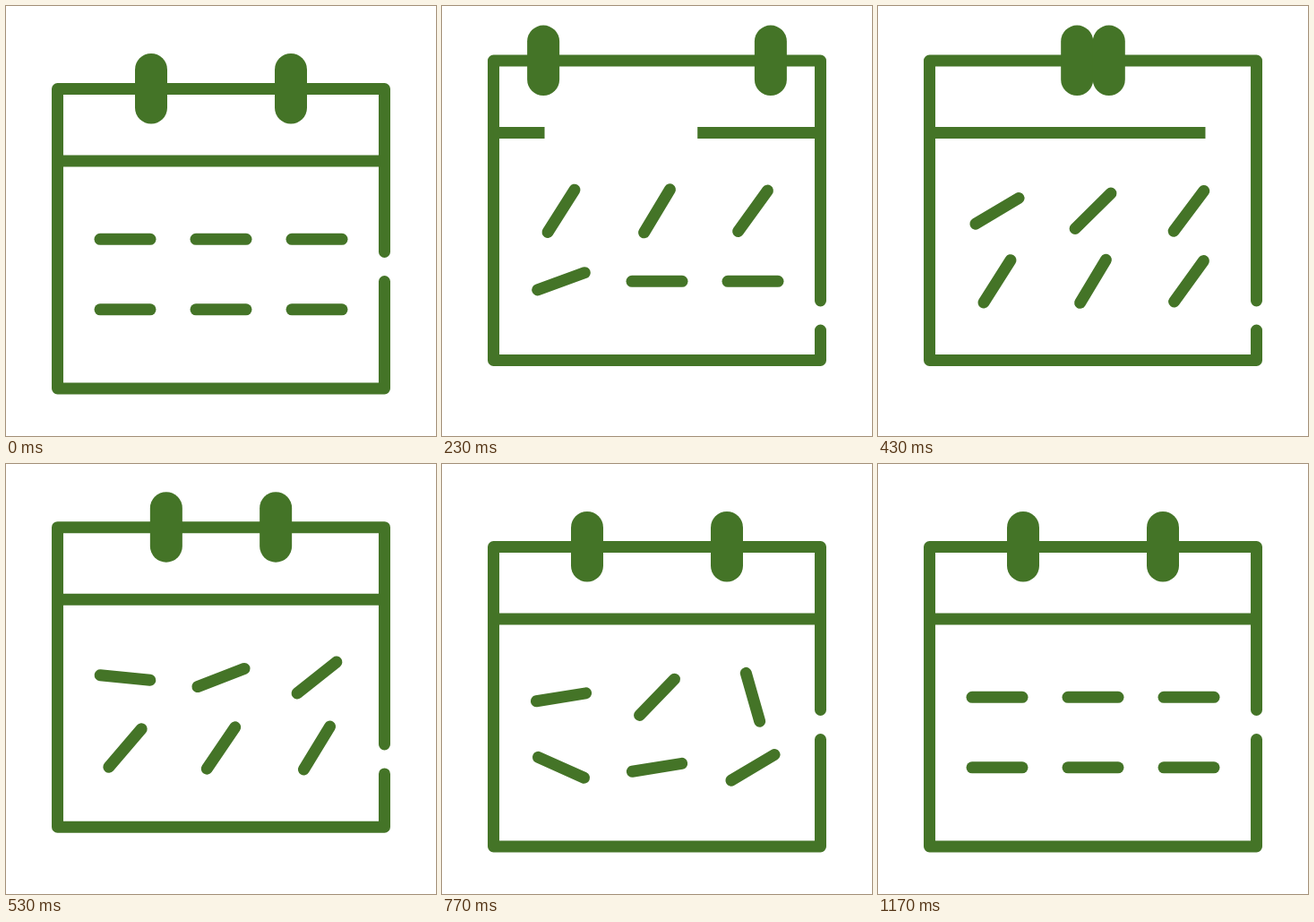
Recreate the animation shown at these times as an HTML page with a canvas. Size 480x480 px, loop 1.53 s.

```html
<!DOCTYPE html>
<html lang="en">
<head>
<meta charset="utf-8">
<title>Calendar</title>
<style>
html, body { margin: 0; height: 100%; overflow: hidden; background: #fff; }
canvas { display: block; }
</style>
</head>
<body>
<canvas id="stage" width="480" height="480"></canvas>
<script>
const ctx = document.getElementById('stage').getContext('2d');
const LOOP = 1530;
const LEFT = 57.5, RIGHT = 422.5, TOP = 92.5, BOTTOM = 427;

// Cubic bezier easing (x1, 0, x2, 1), solved by bisection.
const bezier = (x1, x2) => u => {
  if (u <= 0) return 0;
  if (u >= 1) return 1;
  let lo = 0, hi = 1, s;
  for (let i = 0; i < 24; i++) {
    s = (lo + hi) / 2;
    const x = 3 * x1 * s * (1 - s) ** 2 + 3 * x2 * s * s * (1 - s) + s ** 3;
    if (x < u) lo = s; else hi = s;
  }
  return s * s * (3 - 2 * s);
};
const smooth = bezier(1 / 3, 2 / 3);

// Keys are [tick, value, easing towards this key].
function track(n, keys) {
  let value = keys[0][1];
  for (let i = 1; i < keys.length; i++) {
    const [start, from] = keys[i - 1], [end, to, ease = smooth] = keys[i];
    if (n >= start) value = from + (to - from) * ease((n - start) / (end - start));
  }
  return value;
}

const lift = [[0, 0], [10, -33.5, bezier(.333, .2)], [20, 0, bezier(.8, .667)]];
const slide = [[0, 0], [10, 92, bezier(.25, .25)], [20, 0, bezier(.75, .75)]];
const spread = [[0, 78], [6, 136], [12, 13], [18, 78]];
const erase = [[0, LEFT], [12, RIGHT]];
const redraw = [[4, LEFT], [16, RIGHT]];
const spin = [[0, 0], [5, 59, bezier(.29, .05)], [25, -180, bezier(.8, .67)]];

function line(width, cap, ...points) {
  ctx.lineWidth = width;
  ctx.lineCap = cap;
  ctx.beginPath();
  points.forEach(p => ctx.lineTo(...p));
  ctx.stroke();
}

function draw(n) {
  ctx.setTransform(1, 0, 0, 1, 0, 0);
  ctx.fillStyle = '#fff';
  ctx.fillRect(0, 0, 480, 480);
  ctx.strokeStyle = '#447427';
  ctx.lineJoin = 'round';
  ctx.translate(0, track(n, lift));

  const gap = track(n, slide);
  line(13, 'round', [RIGHT, 307.5 + gap], [RIGHT, BOTTOM], [LEFT, BOTTOM],
    [LEFT, TOP], [RIGHT, TOP], [RIGHT, 274.5 + gap]);

  const drawn = track(n, redraw), erased = track(n, erase);
  if (n > 0 && n < 16) {
    if (drawn > LEFT) line(13, 'butt', [LEFT, 173], [drawn, 173]);
    if (erased < RIGHT) line(13, 'butt', [erased, 173], [RIGHT, 173]);
  } else {
    line(13, 'butt', [LEFT, 173], [RIGHT, 173]);
  }

  const reach = track(n, spread);
  for (const x of [240 - reach, 240 + reach]) line(36, 'round', [x, 71], [x, 113.5]);

  for (let row = 0; row < 2; row++) {
    for (let col = 0; col < 3; col++) {
      const angle = track(n - row * 6 - col * 2, spin) * Math.PI / 180;
      const dx = 28 * Math.cos(angle), dy = -28 * Math.sin(angle);
      const x = 133 + col * 107, y = 260.3 + row * 78.5;
      line(13, 'round', [x - dx, y - dy], [x + dx, y + dy]);
    }
  }
}

// Thirty ticks per second, switching on whole hundredths.
function frame() {
  const t = performance.now() % LOOP;
  draw(Math.floor(Math.floor(t / 10) * .3 + .15));
  requestAnimationFrame(frame);
}
frame();
</script>
</body>
</html>
```
